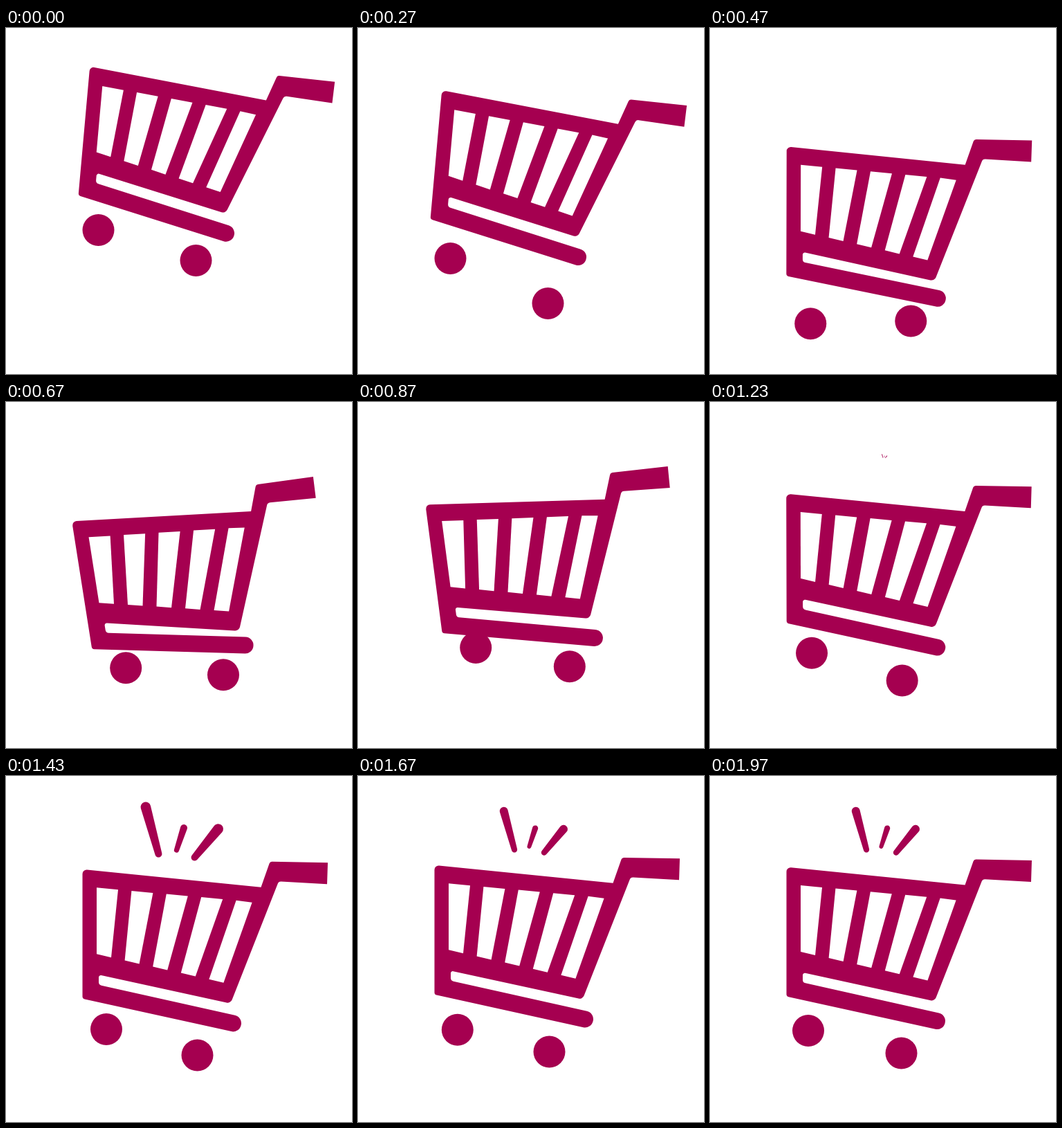
Write an HTML page with a canvas that moves like this. It is 500x500 px and loops after 2.01 s.

```html
<!DOCTYPE html>
<html lang="en">
<head>
<meta charset="utf-8">
<title>Bouncing cart</title>
<style>
html, body { margin: 0; width: 100%; height: 100%; overflow: hidden; background: #fff; }
canvas { display: block; width: 100vmin; height: 100vmin; }
</style>
</head>
<body>
<canvas id="stage" width="500" height="500"></canvas>
<script>
const ctx = document.getElementById('stage').getContext('2d');
const COLOR = '#a50050';
const LOOP = 2010;
const STEP = 100 / 3;
const CENTER = { x: 288, y: 247 };

const ease = u => (1 - Math.cos(Math.PI * u)) / 2;
const clamp = u => Math.min(1, Math.max(0, u));

// Eased moves in turn, each given as begin, end, new value
function glide(t, value, ...moves) {
  for (const [from, to, next] of moves) {
    value += (next - value) * ease(clamp((t - from) / (to - from)));
  }
  return value;
}

// Accelerating drop that stops on landing
const fall = (t, top, drop, time, power) => top + drop * clamp(t / time) ** power;

// Body: drops, tips forward, rebounds and settles
const bodyY = t => glide(t, fall(t, 183.5, 110.5, 490, 1.92),
  [490, 780, 237], [910, 1400, 247.3], [1430, 1710, 241], [1710, 1970, 244]);
const tilt = t => glide(t, 5.1, [310, 700, -9.2], [700, 1280, 0]);
const flex = t => 7.4 * Math.sin(Math.PI * clamp((t - 390) / 460));

const leftX = t => glide(t, 133.5, [330, 710, 174.5], [710, 1340, 145], [1430, 1970, 142]);
const leftY = t => glide(t, fall(t, 292, 141, 476, 2.13),
  [476, 805, 355], [950, 1400, 366], [1430, 1970, 368]);
const rightX = t => glide(t, 274.5, [310, 670, 314], [670, 1305, 276.5]);
const rightY = t => glide(t, fall(t, 336, 97, 320, 2.45),
  [320, 835, 382], [835, 1300, 403.5], [1430, 1720, 398], [1720, 1970, 400.5]);
const sparkScale = t => glide(t, 0, [1200, 1400, 1.01], [1410, 1590, 0.825]);

// Polygon of [x, y, corner radius]
function roundPoly(points) {
  const [ax, ay] = points[0], [bx, by] = points[points.length - 1];
  const mid = [(ax + bx) / 2, (ay + by) / 2];
  ctx.beginPath();
  ctx.moveTo(...mid);
  points.forEach(([x, y, r = 0], i) => {
    const [nx, ny] = points[i + 1] || mid;
    ctx.arcTo(x, y, nx, ny, r);
  });
  ctx.closePath();
  ctx.fill();
}

function disc(x, y, r) {
  ctx.beginPath();
  ctx.arc(x, y, r, 0, Math.PI * 2);
  ctx.fill();
}

function drawCart(t) {
  const f = flex(t), shift = f * 0.3;
  ctx.save();
  ctx.translate(CENTER.x, bodyY(t));
  ctx.rotate(tilt(t) * Math.PI / 180);
  ctx.translate(-CENTER.x, -CENTER.y);
  ctx.fillStyle = COLOR;
  roundPoly([
    [110.5, 134.5, 6], [368.5, 160.5], [381.5, 123.5, 4], [465, 125],
    [464, 156], [394, 152, 5], [324.5, 328.5, 7], [134, 287, 3],
    [134, 301.5, 5], [342.3 + shift, 348 - f, 11.8],
    [337 + shift, 371.3 - f, 11.8], [110.5, 321.5, 4]
  ]);
  ctx.fillStyle = '#fff';
  for (let i = 0; i < 5; i++) {
    const top = 131 + 50.4 * i, low = 131 + 40.6 * i;
    const y = 161 + 4.6 * i, base = 257 + 9.1 * i;
    const wide = i < 4 ? 31 : 23;
    roundPoly([[top, y], [top + wide, y + 3], [low + 21, base + 5], [low, base]]);
  }
  ctx.restore();
}

// Tapered stroke, thick at the outer end
function spark(x0, y0, x1, y1, r0, r1) {
  const a = Math.atan2(y1 - y0, x1 - x0), q = Math.PI / 2;
  ctx.beginPath();
  ctx.arc(x0, y0, r0, a + q, a - q);
  ctx.arc(x1, y1, r1, a - q, a + q);
  ctx.fill();
}

function drawSparks(scale) {
  if (scale <= 0) return;
  ctx.save();
  ctx.translate(252, 78);
  ctx.scale(scale, scale);
  spark(-50, -33, -31.5, 34.5, 7.3, 5);
  spark(5, -3, -5.5, 29, 5, 3.6);
  spark(54.5, -1.5, 20.5, 39.5, 7.3, 5);
  ctx.restore();
}

function draw(t) {
  ctx.fillStyle = '#fff';
  ctx.fillRect(0, 0, 500, 500);
  drawCart(t);
  ctx.fillStyle = COLOR;
  disc(leftX(t), leftY(t), 23);
  disc(rightX(t), rightY(t), 23);
  drawSparks(sparkScale(t));
}

const start = performance.now();
function tick() {
  const t = (performance.now() - start) % LOOP;
  draw(Math.min(59, Math.floor((t + 3.4) / STEP)) * STEP);
  requestAnimationFrame(tick);
}
tick();
</script>
</body>
</html>
```
